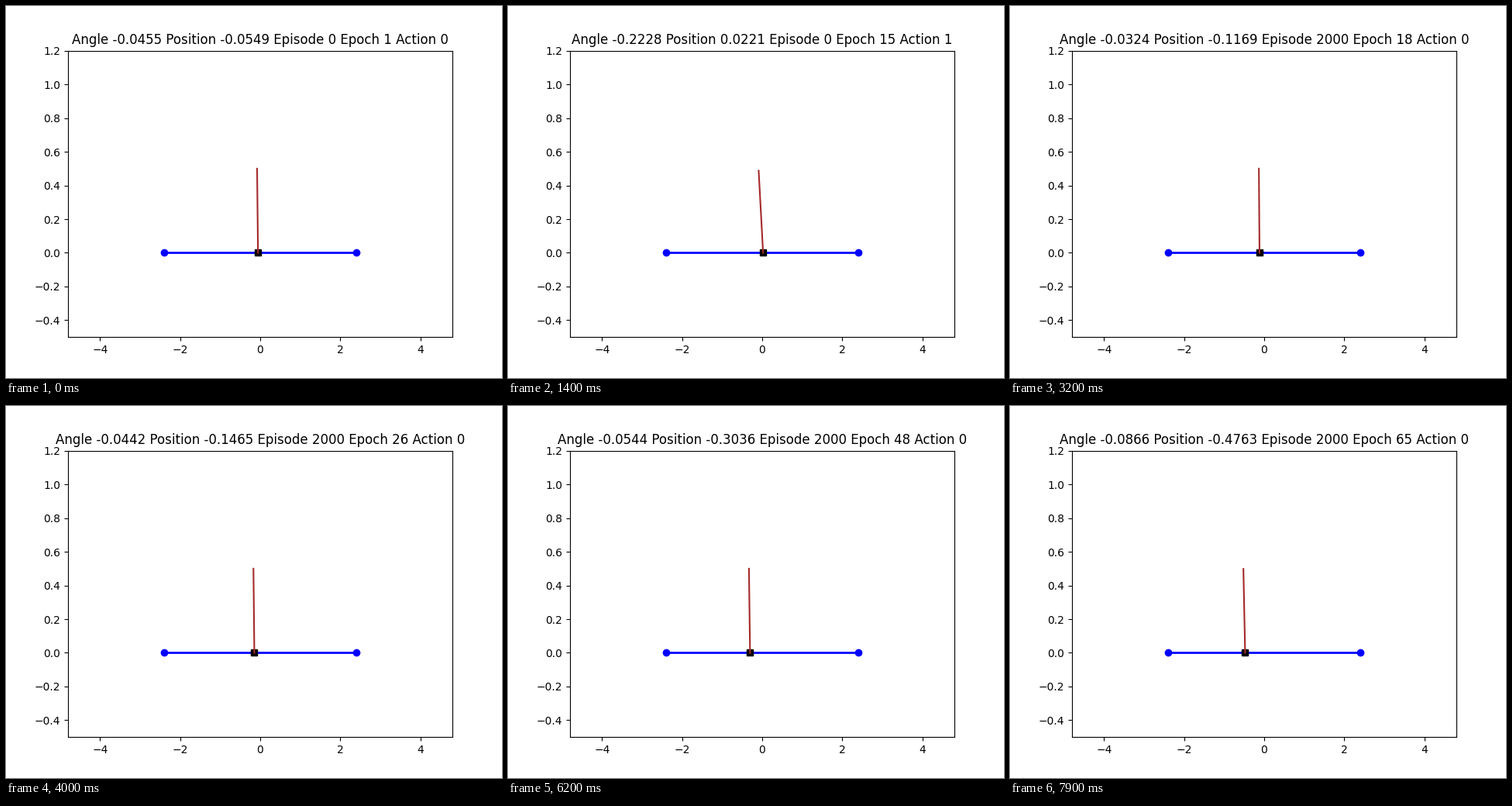
A matplotlib script that plays this animation: 640 px wide and 480 px high, repeating every 8 s.

```python
import numpy as np
import matplotlib.pyplot as plt
from matplotlib.animation import FuncAnimation

DT, GRAVITY, FORCE = 0.02, 9.8, 10.0
MASS, POLE_MASS, HALF = 1.1, 0.1, 0.5

# Each run: episode, pushes (1 = right, 0 = left), waypoints (epoch, position, angle)
RUNS = [
    (0, "011101110101111",
     [(1, -0.0549, -0.0455), (15, 0.0221, -0.2228)]),
    (2000, "10101001" "0" "1101010101010011" "0" "0101010101001"
           "1" "01010010100111" "0" "010100111" "0",
     [(1, -0.0549, -0.0455), (9, -0.0858, -0.029), (26, -0.1465, -0.0442),
      (40, -0.2451, -0.0371), (55, -0.3765, -0.0529), (65, -0.4763, -0.0866)]),
]


def step(state, push):
    """One Euler step of a cart with a pole hinged on it."""
    x, v, a, w = state
    sin, cos = np.sin(a), np.cos(a)
    force = FORCE if push == "1" else -FORCE
    pull = (force + POLE_MASS * HALF * w * w * sin) / MASS
    turn = (GRAVITY * sin - cos * pull) / (
        HALF * (4 / 3 - POLE_MASS * cos * cos / MASS))
    accel = pull - POLE_MASS * HALF * turn * cos / MASS
    return x + DT * v, v + DT * accel, a + DT * w, w + DT * turn


def roll(x, a, speeds, pushes):
    path = [(x, speeds[0], a, speeds[1])]
    for push in pushes:
        path.append(step(path[-1], push))
    return np.array(path)[:, [0, 2]]


def shoot(start, end, pushes):
    """Find the starting speeds that carry the cart to the next waypoint."""
    goal, speeds, eps = np.array(end), np.zeros(2), 1e-5
    for _ in range(12):
        last = roll(*start, speeds, pushes)[-1]
        slope = np.column_stack([
            (roll(*start, speeds + d, pushes)[-1] - last) / eps
            for d in np.eye(2) * eps])
        speeds = speeds + np.linalg.solve(slope, goal - last)
    return roll(*start, speeds, pushes)


def build():
    frames = []
    for episode, pushes, points in RUNS:
        path = [points[0][1:]]
        for (n0, *start), (n1, *end) in zip(points, points[1:]):
            path.extend(shoot(start, end, pushes[n0:n1])[1:])
        for epoch, ((x, a), push) in enumerate(zip(path, pushes), 1):
            frames.append((float(x), float(a), episode, epoch, push))
    return frames


FRAMES = build()

fig, ax = plt.subplots(figsize=(6.4, 4.8), dpi=100)
ax.set_xlim(-4.8, 4.8)
ax.set_ylim(-0.5, 1.2)
ax.plot([-2.4, 2.4], [0, 0], "bo-", linewidth=2)
cart, = ax.plot([], [], "ks")
pole, = ax.plot([], [], color="brown")
title = ax.set_title("")


def draw(i):
    x, a, episode, epoch, push = FRAMES[i]
    cart.set_data([x], [0])
    pole.set_data([x, x + HALF * np.sin(a)], [0, HALF * np.cos(a)])
    title.set_text(f"Angle {round(a, 4)} Position {round(x, 4)} "
                   f"Episode {episode} Epoch {epoch} Action {push}")
    return cart, pole, title


anim = FuncAnimation(fig, draw, frames=len(FRAMES), interval=100,
                     repeat=True, repeat_delay=0, blit=False)
plt.show()
```
